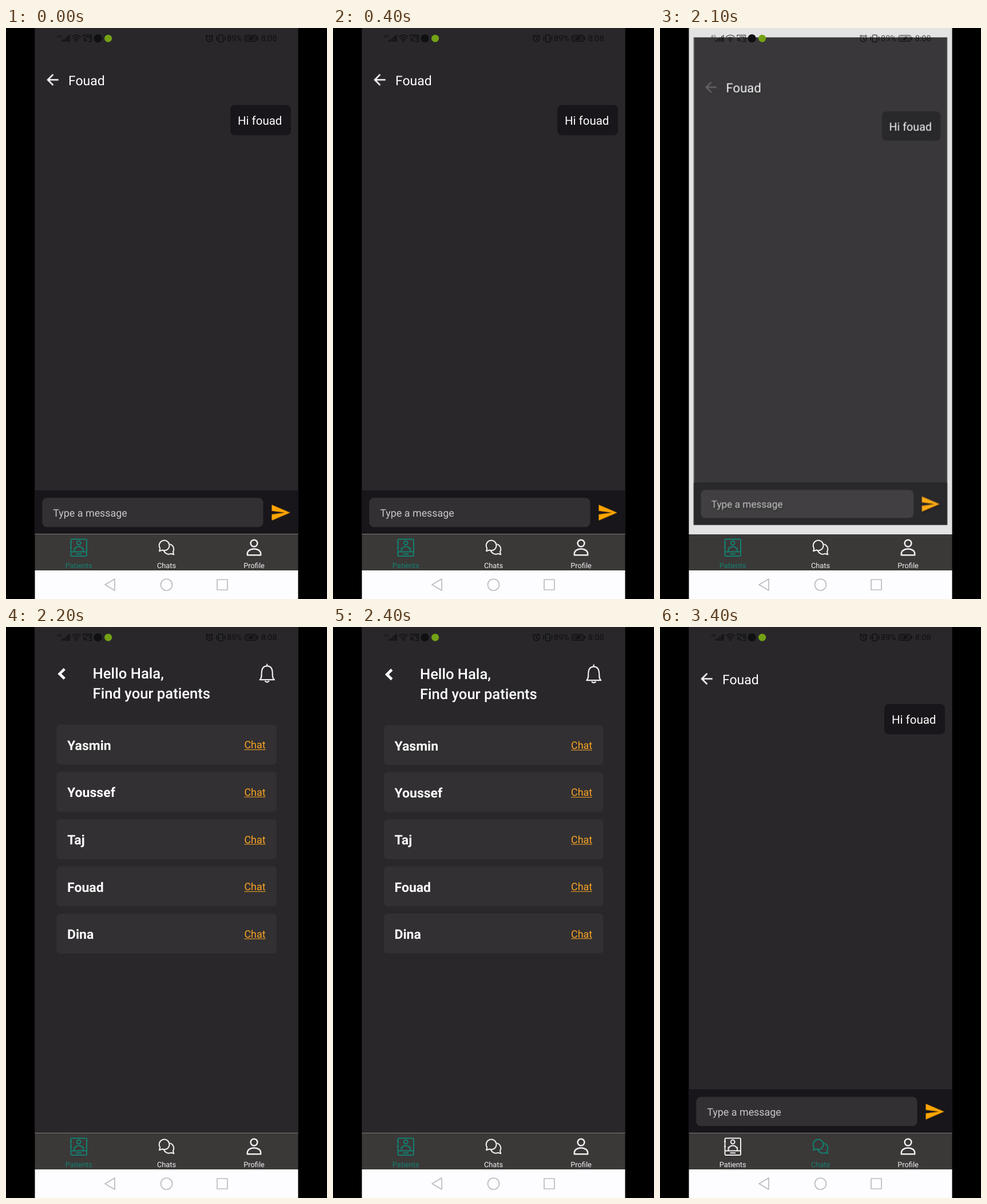
Animation, 561 px wide and 998 px high, one loop 4700 ms. Source, as an HTML page:

```html
<!DOCTYPE html>
<html lang="en">
<head>
<meta charset="utf-8">
<title>Patient chat</title>
<style>
html, body { margin: 0; width: 100%; height: 100%; overflow: hidden; background: #000; }
svg { display: block; width: 100vw; height: 100vh; }
text { font-family: Roboto, Arial, sans-serif; fill: #fff; text-rendering: geometricPrecision; }
.line { fill: none; stroke: currentColor; stroke-width: 2; stroke-linejoin: round; }
.tab { color: #f0f0f0; }
.tab text { font-size: 12.8px; text-anchor: middle; fill: currentColor; }
.name { font-size: 23px; font-weight: 700; }
.hello { font-size: 25.56px; font-weight: 500; }
.link { font-size: 17.9px; fill: #fba524; }
.chat, .list { transform-origin: 280.5px 442.5px; transform-box: view-box; }

.chat, .list, .backdrop, .back, .shade, .patients, .chats {
  animation: 4.7s step-end infinite;
}
.chat { animation-name: chat; }
.list { animation-name: list; }
.backdrop { animation-name: backdrop; }
.back { animation-name: back; }
.shade { animation-name: shade; }
.patients { animation-name: patients; }
.chats { animation-name: chats; }

@keyframes chat {
  0% { opacity: 1; transform: none; }
  44.68% { opacity: .915; transform: scale(.963); }
  46.8% { opacity: 0; transform: none; }
  65.95%, 100% { opacity: 1; transform: none; }
}
@keyframes list {
  0% { opacity: 0; transform: none; }
  46.8% { opacity: 1; transform: scale(1.003); }
  48.93% { opacity: 1; transform: scale(1.001); }
  51.06% { opacity: 1; transform: none; }
  65.95%, 100% { opacity: 0; transform: none; }
}
@keyframes backdrop {
  0% { opacity: 0; }
  44.68% { opacity: 1; }
  46.8%, 100% { opacity: 0; }
}
@keyframes back {
  0% { opacity: 1; }
  38.29% { opacity: .23; }
  65.95%, 100% { opacity: 1; }
}
@keyframes shade {
  0% { filter: none; }
  44.68% { filter: drop-shadow(1px 2px 1px rgba(0, 0, 0, .55)); }
  46.8%, 100% { filter: none; }
}
@keyframes patients {
  0% { color: #12806f; }
  65.95%, 100% { color: #f0f0f0; }
}
@keyframes chats {
  0% { color: #f0f0f0; }
  65.95%, 100% { color: #12806f; }
}
</style>
</head>
<body>
<svg viewBox="0 0 561 998">
  <defs>
    <clipPath id="screen"><rect x="50.5" width="460" height="884"/></clipPath>
  </defs>
  <rect width="561" height="998"/>
  <rect x="50.5" width="460" height="885" fill="#29272a"/>

  <!-- tab bar -->
  <rect x="50.5" y="884" width="460" height="64" fill="#3b3838"/>
  <rect x="50.5" y="884" width="460" height="1" fill="#7d7b7b"/>
  <g class="tab patients">
    <g class="line">
      <rect x="113.5" y="893.5" width="27.5" height="29.5" rx="2"/>
      <circle cx="127.2" cy="900" r="3.4"/>
      <path d="M119.5 914.5V909.5H121.5C121.5 905.5 132.9 905.5 132.9 909.5H135V914.5M114 915.5H141M122.5 919.3H132"/>
      <path d="M112 899H115M112 908H115"/>
    </g>
    <text x="127.2" y="944">Patients</text>
  </g>
  <g class="tab chats">
    <g class="line" stroke-width="1.9">
      <path d="M268 914.3L269.2 909.4A8.9 8.9 0 1 1 277.5 913.3Q275.5 913.3 273.3 912.5Z"/>
      <path d="M286.3 902.2A8.8 8.8 0 0 1 291.9 915.4L293.3 920.2L288.2 918.8A8.9 8.9 0 0 1 275.9 913.4"/>
    </g>
    <text x="280.5" y="944">Chats</text>
  </g>
  <g class="tab">
    <g class="line" style="stroke-width:2.5">
      <circle cx="433.5" cy="900.6" r="5.9"/>
      <path d="M421.8 921.2V919C421.8 907.6 445.2 907.6 445.2 919V921.2Z"/>
    </g>
    <text x="433.5" y="944">Profile</text>
  </g>

  <!-- system navigation -->
  <rect x="50.5" y="948" width="460" height="50" fill="#fdfcfe"/>
  <g class="line" color="#bcbabd" style="stroke-width:1.7">
    <path d="M173 973L190 963V983Z"/>
    <circle cx="280.5" cy="973" r="10"/>
    <rect x="369" y="964" width="18" height="18"/>
  </g>

  <rect class="backdrop" x="50.5" width="460" height="885" fill="#e3e3e3"/>

  <g clip-path="url(#screen)">
    <!-- patient list -->
    <g class="list">
      <rect x="50.5" width="460" height="885" fill="#29272a"/>
      <path d="M102.8 74.5L94.2 83L102.8 91.5" fill="none" stroke="#fff" stroke-width="4.6"/>
      <text class="hello" x="152" y="91.4">Hello Hala,</text>
      <text class="hello" x="152" y="126">Find your patients</text>
      <g class="line" color="#eee" style="stroke-width:2.2">
        <path d="M443.2 93.2C446 90.5 446.2 88 446.2 82.5C446.2 73.5 449.8 69.3 455.7 69.3S465.2 73.5 465.2 82.5C465.2 88 465.4 90.5 468.3 93.2Z"/>
        <path d="M455.7 69V65.6M452 95.2Q455.7 99.6 459.4 95.2"/>
      </g>
      <g id="cards"></g>
    </g>

    <!-- conversation -->
    <g class="chat">
      <rect x="50.5" width="460" height="885" fill="#29272a"/>
      <path class="back" fill="#fff" transform="translate(66.1 75.2) scale(1.278)" d="M20 11H7.83l5.59-5.59L12 4l-8 8 8 8 1.41-1.41L7.83 13H20z"/>
      <rect x="392" y="134.5" width="106" height="53" rx="8" fill="#18161a"/>
      <rect x="50.5" y="808" width="460" height="77" fill="#18161a"/>
      <rect x="63.3" y="821.3" width="386.2" height="51" rx="8" fill="#323032"/>
      <g class="shade">
        <text x="109" y="99.8" font-size="23">Fouad</text>
        <text x="405" y="168.9" font-size="20.45">Hi fouad</text>
        <text x="82.3" y="853.5" font-size="17.9" style="fill:#c9c8c9">Type a message</text>
        <path fill="#ffa500" transform="translate(461.4 828.7) scale(1.53)" d="M2.01 21L23 12 2.01 3 2 10l15 2-15 2z"/>
      </g>
    </g>
  </g>

  <!-- status bar -->
  <g opacity=".62">
    <text x="89" y="17" font-size="7" style="fill:#000">4G</text>
    <path d="M98 24V21M101.3 24V19M104.6 24V16.5M107.9 24V14M110.6 24V12" stroke="#000" stroke-width="1.9"/>
    <g class="line" color="#000" style="stroke-width:1.5">
      <path d="M115.3 15.6Q123 9 130.7 15.6M117.8 18.5Q123 14 128.2 18.5M120.2 21.2Q123 18.8 125.8 21.2"/>
      <path d="M135 15.5V12.5H149.3V23.5H144M135 17.8Q140.6 18.2 141 23.8M135 20.6Q138 20.8 138.3 23.8M139 15.5H146.5V20.5"/>
      <circle cx="355.5" cy="18.6" r="5.2"/>
      <path d="M355.5 15.5V19L358 20.3M349.2 14.6L352.3 12M358.7 12L361.8 14.6"/>
      <rect x="371.5" y="12.2" width="7.6" height="12.4" rx="1"/>
      <path d="M368.3 14.5V22M382.4 14.5V22"/>
      <rect x="417.3" y="12.7" width="20.8" height="10.8" rx="2" style="stroke-width:1"/>
    </g>
    <rect x="417.5" y="13" width="20.4" height="10.2" rx="2" opacity=".35"/>
    <path d="M424 20.5L428.3 15.5L432.5 15L428.8 20.5ZM439.2 15.5H440.8V20.8H439.2Z"/>
    <circle cx="123" cy="23" r="1.3"/>
    <text x="386" y="23.4" font-size="14.5" style="fill:#000">89%</text>
    <text x="445.7" y="23.4" font-size="14.5" style="fill:#000">8:08</text>
  </g>
  <circle cx="160.6" cy="18.2" r="7.2" fill="#100f11"/>
  <circle cx="178.6" cy="18.2" r="6.5" fill="#74a215"/>
</svg>
<script>
const names = ["Yasmin", "Youssef", "Taj", "Fouad", "Dina"];
const card = (name, i) => `<g transform="translate(0 ${i * 82.4})">
  <rect x="88.9" y="171.4" width="383.4" height="69.6" rx="6.4" fill="#323032"/>
  <text class="name" x="107.5" y="215.5">${name}</text>
  <text class="link" x="416" y="213">Chat</text>
  <rect x="416" y="214.6" width="37" height="1" fill="#fba524"/>
</g>`;
document.getElementById("cards").innerHTML = names.map(card).join("");
</script>
</body>
</html>
```
